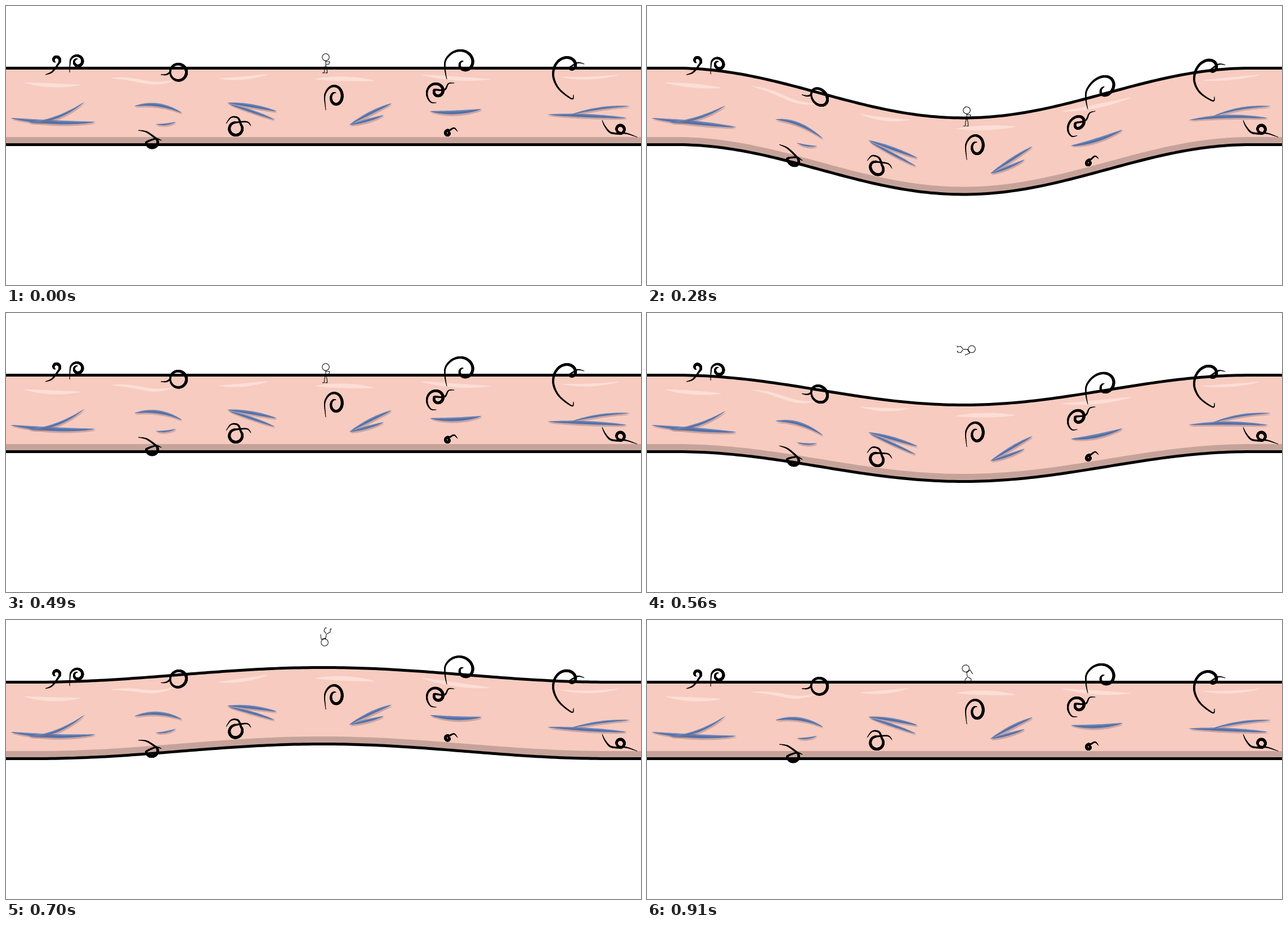
Animation of 1128x496 px, one loop 0.98 s. Source, as an HTML page with a canvas:

```html
<!DOCTYPE html>
<html lang="en">
<head>
<meta charset="utf-8">
<title>Bouncing on a vein</title>
<style>
  html, body { margin: 0; width: 100%; height: 100%; overflow: hidden; background: #fff; }
  canvas { display: block; width: 100%; height: 100%; }
</style>
</head>
<body>
<canvas id="stage" width="1128" height="496"></canvas>
<script>
const ctx = document.getElementById('stage').getContext('2d');
const W = 1128, H = 496, STEP = 70, STEPS = 14, LEAP = 7;
const { PI, sin, cos, sqrt, max, min } = Math;
const rad = degrees => degrees * PI / 180;

let sag = 0;

// Linear interpolation through [step, value] keys
function track(keys, s) {
  const i = keys.findIndex(([at]) => at >= s);
  if (i < 1) return keys[0][1];
  const [a, from] = keys[i - 1], [b, to] = keys[i];
  return from + (to - from) * (s - a) / (b - a);
}

const sagAt = s => track([[0, 0], [.67, 0], [5, 115], [LEAP, 0], [8, 53], [9, -27], [10, -26], [13, 0]], s);

// One cosine trough across the stage
function bend(x) {
  const t = min(1, max(0, (x - 52) / 1020));
  return sag * (1 - cos(2 * PI * t)) / 2;
}

function trace(points) {
  ctx.beginPath();
  for (const [x, y] of points) ctx.lineTo(x, y + bend(x));
}

function level(y) {
  const points = [];
  for (let x = -8; x <= W + 8; x += 8) points.push([x, y]);
  return points;
}

function strip(top, bottom, color) {
  trace([...level(top), ...level(bottom).reverse()]);
  ctx.fillStyle = color;
  ctx.fill();
}

function line(y) {
  trace(level(y));
  ctx.lineWidth = 5;
  ctx.stroke();
}

// Pointed sliver between two ends, bowed and optionally wavy
function blade(x0, y0, x1, y1, bow, thick, color, wave = 0) {
  const upper = [], lower = [], n = 24;
  for (let i = 0; i <= n; i++) {
    const t = i / n, half = thick / 2 * sin(PI * t) ** .7;
    const x = x0 + (x1 - x0) * t;
    const y = y0 + (y1 - y0) * t + bow * 4 * t * (1 - t) + wave * sin(2 * PI * t);
    upper.push([x, y - half]);
    lower.unshift([x, y + half]);
  }
  trace([...upper, ...lower]);
  ctx.fillStyle = color;
  ctx.fill();
}

const shine = (x0, y0, x1, y1, bow, thick, wave) => blade(x0, y0, x1, y1, bow, thick, '#fcded6', wave);

function vein(x0, y0, x1, y1, bow, thick) {
  blade(x0 + 2, y0 + 3, x1 + 1, y1 + 3, bow, thick, 'rgba(130, 95, 105, .35)');
  blade(x0, y0, x1, y1, bow, thick, '#6d87ba');
  blade(x0, y0 + .8, x1, y1 + .8, bow, thick * .5, '#536ea3');
}

// Catmull-Rom sampling
function smooth(pts, n = 6) {
  const at = i => pts[min(pts.length - 1, max(0, i))];
  const out = [];
  for (let i = 0; i < pts.length - 1; i++) {
    const [a, b, c, d] = [at(i - 1), at(i), at(i + 1), at(i + 2)];
    for (let k = 0; k < n; k++) {
      const t = k / n;
      out.push([0, 1].map(j => b[j] + t / 2 * (c[j] - a[j] +
        t * (2 * a[j] - 5 * b[j] + 4 * c[j] - d[j] + t * (3 * (b[j] - c[j]) + d[j] - a[j])))));
    }
  }
  return [...out, at(pts.length - 1)];
}

const parse = text => text ? text.split(' ').map(p => p.split(',').map(Number)) : [];

// Root points, a logarithmic spiral, then the tip points
function hair({ root, x, y, r, to, from, sweep, squash = 1, tip = '', width = 5 }) {
  const coil = [], n = Math.ceil(Math.abs(sweep) / 30);
  for (let i = 0; i <= n; i++) {
    const t = i / n, a = rad(from + sweep * t), d = r * (to / r) ** t;
    coil.push([x + d * cos(a), y + d * squash * sin(a)]);
  }
  return { width, points: smooth([...parse(root), ...coil, ...parse(tip)]) };
}

const hairs = [
  hair({ root: '70,122 82,117', x: 89, y: 96, r: 7.5, to: 4, from: 50, sweep: -300 }),
  hair({ root: '113,118', x: 127, y: 99, r: 13, to: 5, from: 180, sweep: 450 }),
  hair({ root: '275,122 284,122', x: 306, y: 118, r: 15, to: 14, from: 180, sweep: 400 }),
  hair({ root: '783,130 780,114', x: 813, y: 103, r: 33, to: 5, from: 190, sweep: 430 }),
  hair({ root: '1008,158 1005,165', x: 1003, y: 108, r: 45, to: 3, from: 116, sweep: 384, tip: '1015,101 1027,103' }),
  hair({ root: '568,185', x: 585, y: 162, r: 19, to: 6, from: 180, sweep: 460, squash: 1.3 }),
  hair({ root: '764,172', x: 766, y: 152, r: 22, to: 5, from: 120, sweep: 460, tip: '779,149 786,138 796,137' }),
  hair({ root: '391,209 400,198 412,199', x: 408, y: 218, r: 12, to: 11, from: -40, sweep: 300, tip: '408,207 428,206 435,213' }),
  hair({ root: '235,221 250,224', x: 259, y: 243, r: 11, to: 9, from: -50, sweep: 240, squash: .9, tip: '266,236 276,239' }),
  hair({ root: '802,223 796,217', x: 785, y: 226, r: 6, to: 2, from: -60, sweep: -400 }),
  hair({ root: '1059,203 1064,214 1074,225', x: 1091, y: 219, r: 8, to: 6, from: 100, sweep: -360, tip: '1104,227 1121,233' })
];

function drawHair({ width, points }) {
  const last = points.length - 1;
  for (let i = 0; i < last; i++) {
    ctx.lineWidth = width * max(.2, sqrt(sin(PI * (i + .5) / last)));
    trace([points[i], points[i + 1]]);
    ctx.stroke();
  }
}

// Rides the band, then leaps along a parabola while turning over
function drawFigure(s) {
  const air = s > LEAP;
  const y = air ? 31 + 7.6 * (s - 10.1) ** 2 : track([[0, 100], [1, 107], [LEAP, 105]], s) + sag;
  const spread = rad(air ? 50 : 12), knee = rad(air ? 60 : 8);
  ctx.save();
  ctx.translate(568, y);
  ctx.rotate(air ? rad(52 * (s - 6.3)) : 0);
  ctx.lineWidth = 1.1;
  ctx.setLineDash(air ? [1.5, 1] : [2.5, 1]);
  ctx.beginPath();
  ctx.moveTo(0, -3);
  ctx.lineTo(0, 7);
  for (const side of [-1, 1]) {
    const kx = side * (1 + 6 * sin(spread)), ky = 7 + 6 * cos(spread);
    const shin = spread - knee;
    const fx = kx + side * 6 * sin(shin), fy = ky + 6 * cos(shin);
    ctx.moveTo(side, 7);
    ctx.lineTo(kx, ky);
    ctx.lineTo(fx, fy);
    ctx.lineTo(fx - 3, fy);
  }
  ctx.moveTo(0, -1);
  ctx.lineTo(7, air ? -5 : -1);
  ctx.lineTo(air ? 10 : 6, 3);
  if (!air) ctx.lineTo(1, 4);
  ctx.stroke();
  ctx.beginPath();
  ctx.arc(0, -9, 6.2, 0, 2 * PI);
  ctx.fillStyle = '#fff';
  ctx.fill();
  ctx.stroke();
  ctx.restore();
}

function draw(s) {
  sag = sagAt(s);
  ctx.fillStyle = '#fff';
  ctx.fillRect(0, 0, W, H);
  strip(111, 246, '#f7cbbf');
  strip(233, 246, '#c6a39a');

  shine(32, 136, 133, 140, 3, 7);
  shine(185, 128, 302, 131, 5, 6, -3);
  shine(377, 129, 467, 121, 3, 6);
  shine(548, 130, 655, 133, -2, 8);
  shine(737, 122, 861, 130, 3, 7);
  shine(985, 126, 1090, 122, 4, 5);

  vein(8, 199, 159, 206, 4, 7);
  vein(40, 207, 140, 170, 9, 5);
  vein(228, 178, 313, 190, -8, 6);
  vein(266, 210, 302, 206, 2, 3);
  vein(393, 172, 481, 187, -2, 6);
  vein(395, 174, 478, 202, -1, 5);
  vein(610, 211, 685, 173, -2, 6);
  vein(610, 211, 671, 194, 1, 5);
  vein(753, 187, 845, 183, 4, 7);
  vein(962, 193, 1103, 199, -1, 6);
  vein(1000, 194, 1108, 178, -4, 4);

  ctx.strokeStyle = '#000';
  ctx.lineCap = ctx.lineJoin = 'round';
  line(110.5);
  line(246.5);
  hairs.forEach(drawHair);
  drawFigure(s);
}

const start = performance.now();
let shown = -1;

function tick() {
  const step = Math.floor((performance.now() - start) / STEP) % STEPS;
  if (step !== shown) draw(shown = step);
  requestAnimationFrame(tick);
}
tick();
</script>
</body>
</html>
```
